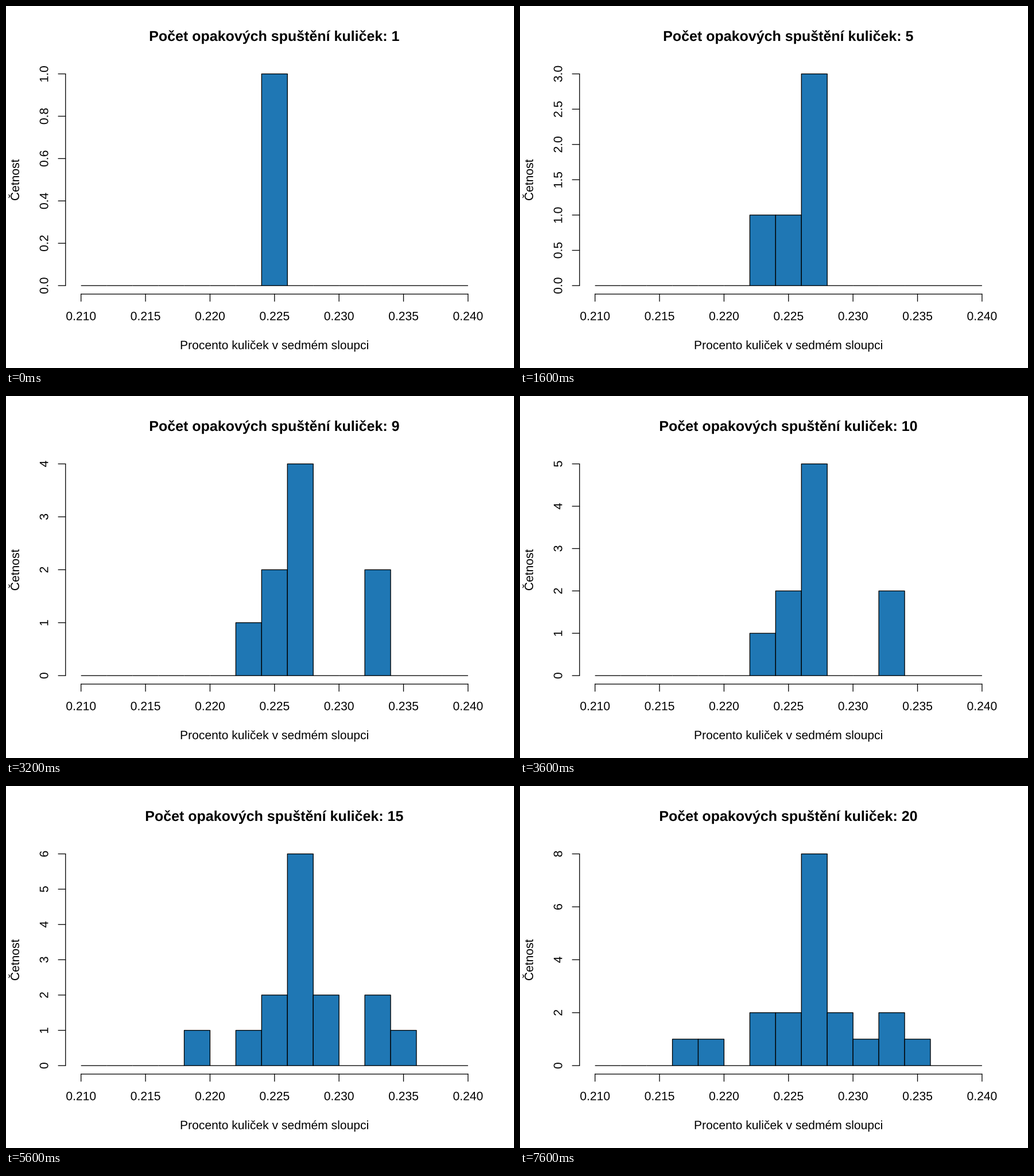
Recreate the animation shown at these times as a matplotlib script. Size 885 by 632 pixels, loop 8000 ms.

```python
import math

import matplotlib.pyplot as plt
import numpy as np
from matplotlib.animation import FuncAnimation
from matplotlib.patches import PathPatch, Rectangle
from matplotlib.textpath import TextPath
from matplotlib.transforms import Affine2D

WIDTH, HEIGHT, DPI = 885, 632, 128
LINE = 25.3                # height of one margin line, in pixels
FONT, TITLE_FONT = LINE / 1.2, 25
STROKE = 1.31 * 72 / DPI

# Plot region inside the margins, and the data range with 4% padding
LEFT, RIGHT = 4.1 * LINE, WIDTH - 2.1 * LINE
TOP, BOTTOM = 4.1 * LINE, HEIGHT - 5.1 * LINE
PAD_X, PAD_Y = (RIGHT - LEFT) * 0.04 / 1.08, (BOTTOM - TOP) * 0.04 / 1.08
X0, X1 = LEFT + PAD_X, RIGHT - PAD_X
Y0, Y1 = BOTTOM - PAD_Y, TOP + PAD_Y
CENTER_X, CENTER_Y = (LEFT + RIGHT) / 2, (TOP + BOTTOM) / 2

BINS = 15
BIN_WIDTH = (X1 - X0) / BINS
# Histogram bin hit by each successive run
RUNS = [7, 8, 8, 6, 8, 11, 7, 8, 11, 8, 4, 12, 8, 9, 9, 3, 6, 8, 10, 8]

fig = plt.figure(figsize=(WIDTH / DPI, HEIGHT / DPI), dpi=DPI, facecolor="white")
ax = fig.add_axes([0, 0, 1, 1])


def label(x, y, text, size=FONT, weight="normal", angle=0):
    """Text outline centred on x, y along its baseline, without pixel rounding."""
    path = TextPath((0, 0), text, size=size,
                    prop={"family": "Liberation Sans", "weight": weight})
    box = path.get_extents()
    place = (Affine2D().translate(-(box.x0 + box.x1) / 2, 0)
             .rotate_deg(angle).scale(1, -1).translate(x, y))
    ax.add_patch(PathPatch(place.transform_path(path), facecolor="black",
                           lw=0, snap=False))


def line(xs, ys):
    ax.plot(xs, ys, color="black", lw=STROKE, solid_capstyle="round", snap=False)


def tick_step(top):
    """Round step that splits 0..top into about five intervals."""
    cell = top / 5
    base = step = 10 ** math.floor(math.log10(cell))
    for factor, bias in ((2, 0.8), (5, 1.7), (10, 0.8)):
        if factor * base - cell < bias * (cell - step):
            step = factor * base
    return step


def draw_x_axis():
    line([X0, X1], [BOTTOM, BOTTOM])
    for i in range(7):
        x = X0 + (X1 - X0) * i / 6
        line([x, x], [BOTTOM, BOTTOM + LINE / 2])
        label(x, BOTTOM + 1.8 * LINE, f"{0.21 + 0.005 * i:.3f}")
    label(CENTER_X, BOTTOM + 3.8 * LINE, "Procento kuliček v sedmém sloupci")


def draw_y_axis(top):
    step = tick_step(top)
    decimals = 1 if step < 1 else 0
    line([LEFT, LEFT], [Y0, Y1])
    for value in np.arange(0, top + step / 2, step):
        y = Y0 + (Y1 - Y0) * value / top
        line([LEFT - LINE / 2, LEFT], [y, y])
        label(LEFT - 1.2 * LINE, y, f"{value:.{decimals}f}", angle=90)
    label(LEFT - 3.2 * LINE, CENTER_Y, "Četnost", angle=90)


def draw_bars(counts):
    unit = (Y1 - Y0) / counts.max()
    for i, count in enumerate(counts):
        ax.add_patch(Rectangle((X0 + i * BIN_WIDTH, Y0), BIN_WIDTH, count * unit,
                               facecolor="#1f77b4", edgecolor="black", lw=STROKE,
                               joinstyle="round", snap=False, zorder=2))


def draw(frame):
    ax.clear()
    ax.set_xlim(0, WIDTH)
    ax.set_ylim(HEIGHT, 0)
    ax.axis("off")
    runs = frame + 1
    counts = np.bincount(RUNS[:runs], minlength=BINS)
    draw_bars(counts)
    draw_x_axis()
    draw_y_axis(counts.max())
    label(CENTER_X, 61, f"Počet opakových spuštění kuliček: {runs}",
          size=TITLE_FONT, weight="bold")
    return []


anim = FuncAnimation(fig, draw, frames=len(RUNS), init_func=lambda: draw(0),
                     interval=400, repeat=True, repeat_delay=0)
plt.show()
```
